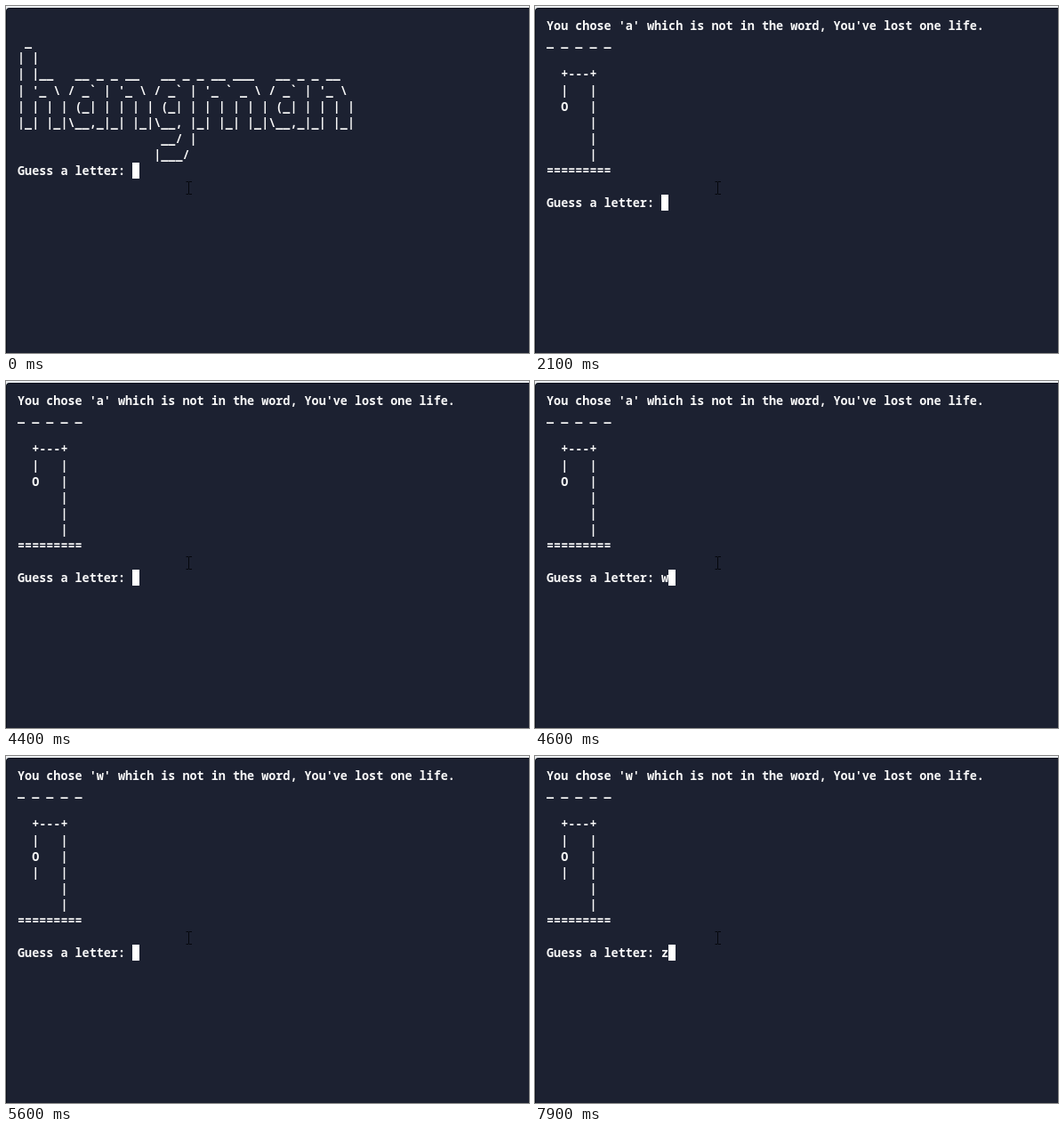
Recreate the animation shown at these times as an HTML page. Size 588x390 px, loop 8000 ms.

```html
<!DOCTYPE html>
<html lang="en">
<head>
<meta charset="utf-8">
<title>Hangman</title>
<style>
  html, body { margin: 0; width: 100%; height: 100%; overflow: hidden; background: #eceef1; }
  #pane {
    position: absolute; left: 0; top: 2px; width: 588px; height: 388px; box-sizing: border-box;
    background: #1c2131; border: solid #0c111d; border-width: 1px 0 0 1px; border-top-left-radius: 4px;
  }
  #term {
    position: absolute; left: 13px; top: 13px; margin: 0; color: #f8f8f8;
    font: 600 13.45px/18.13px "Noto Sans Mono", "DejaVu Sans Mono", monospace;
    font-variant-ligatures: none; white-space: pre;
  }
  #caret { position: absolute; width: 8px; height: 18px; background: #fff; }
  svg { position: absolute; left: 202px; top: 196px; }
</style>
</head>
<body>
<div id="pane"></div>
<pre id="term"></pre>
<div id="caret"></div>
<svg width="8" height="17" fill="none" stroke="#05070c"><path d="M0.5 1.5H3L3.5 2L4 1.5H7M3.5 2V15M0.5 15.5H3L3.5 15L4 15.5H7"/></svg>
<script>
const LOOP = 8000, CELL = 8.07, ROW = 18.13, LEFT = 13, TOP = 13;
const PROMPT = "Guess a letter: ";
const term = document.getElementById("term");
const caret = document.getElementById("caret");

const banner = String.raw`
 _
| |
| |__   __ _ _ __   __ _ _ __ ___   __ _ _ __
| '_ \ / _~ | '_ \ / _~ | '_ ~ _ \ / _~ | '_ \
| | | | (_| | | | | (_| | | | | | | (_| | | | |
|_| |_|\__,_|_| |_|\__, |_| |_| |_|\__,_|_| |_|
                    __/ |
                   |___/
`.replaceAll("~", "`");

const round = (letter, torso) => `You chose '${letter}' which is not in the word, You've lost one life.
_ _ _ _ _

  +---+
  |   |
  O   |
  ${torso}   |
      |
      |
=========

`;

// [start in ms, screen, typed letter]
const steps = [
  [0, banner, ""],
  [700, banner, "a"],
  [2100, round("a", " "), ""],
  [4500, round("a", " "), "w"],
  [4700, round("w", "|"), ""],
  [6200, round("w", "|"), "z"],
];

let shown;
function draw(now) {
  const t = now % LOOP;
  const step = steps.findLast(s => s[0] <= t);
  if (step !== shown) {
    shown = step;
    const [, screen, typed] = step;
    term.textContent = screen + PROMPT + typed;
    const row = screen.split("\n").length - 1;
    caret.style.left = Math.round(LEFT + (PROMPT + typed).length * CELL) + "px";
    caret.style.top = Math.round(TOP + row * ROW) + "px";
  }
  requestAnimationFrame(draw);
}
draw(performance.now());
</script>
</body>
</html>
```
